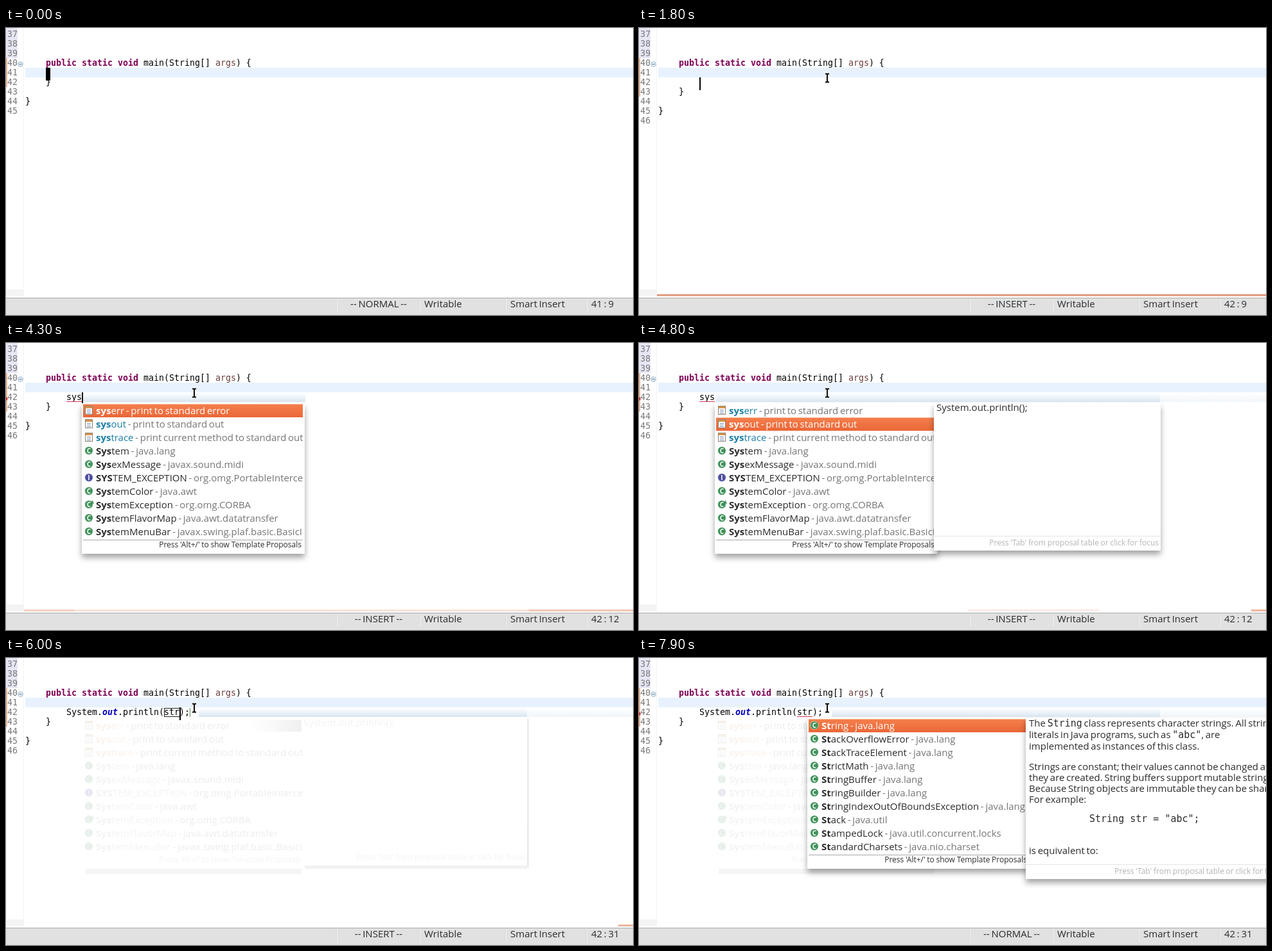
Animation of 976x448 px, one loop 8 s. Source, as an HTML page:

```html
<!DOCTYPE html>
<html lang="en">
<head>
<meta charset="utf-8">
<title>Editor completion</title>
<style>
  html, body { margin: 0; width: 100%; height: 100%; overflow: hidden; background: #fff; }
  svg { display: block; }
  text { white-space: pre; font: 15px "Open Sans", "Noto Sans", sans-serif; word-spacing: -1.2px; fill: #2c2c2c; }
  .code, .mono { font-family: "DejaVu Sans Mono", monospace; word-spacing: 0; }
  .code { font-size: 13.29px; fill: #000; }
  .num { fill: #787878; }
  .kw { font-weight: 700; fill: #7f0055; }
  .arg { fill: #6a3e3e; }
  .field { font-weight: 700; font-style: italic; fill: #0000c0; }
  .small { font-size: 12px; word-spacing: -.4px; }
  .hint { fill: #b4b4b4; }
  .grey { fill: #767676; }
  .tpl { fill: #1b7fa6; }
  .sel, .sel tspan { fill: #fff; }
  .b { font-weight: 700; }
  .icon { font-size: 10px; font-weight: 700; fill: #fff; }
  .shadow { filter: drop-shadow(0 6px 5px rgba(0, 0, 0, .36)); }
  .ghost { opacity: .13; }
  .ghost text { fill: #aaa; }
  .ghost .grey { fill: #777; }
  .ghost .tpl { fill: #e6a070; }
</style>
</head>
<body>
<svg id="stage" width="976" height="448" viewBox="0 0 976 448" xmlns="http://www.w3.org/2000/svg"></svg>
<script>
const LOOP = 8000, TICK = 100, BLINK = 500;
const OPEN = 700, LIST = 3900, DOC = 4400, ACCEPT = 4900, ESC = 6300;

// Tables of [time, value...]
const typed = [[0, ''], [2000, 's'], [2200, 'sy'], [2400, 'sys'], [ACCEPT, ''], [5400, 's'], [5600, 'st'], [5900, 'str']];
const position = [[0, '41 : 9'], [OPEN, '42 : 9'], [2000, '42 : 10'], [2200, '42 : 11'], [2400, '42 : 12'],
  [ACCEPT, '42 : 28'], [5400, '42 : 29'], [5600, '42 : 30'], [5900, '42 : 31']];
const mode = [[0, 'NORMAL'], [OPEN, 'INSERT'], [ESC, 'NORMAL']];
const caretAt = [[0, 62], [OPEN, 94], [2000, 102], [2200, 110], [2400, 118], [LIST, 118],
  [ACCEPT, 246], [5400, 254], [5600, 262], [5900, 270], [ESC, 262]];
const underline = [[0, 0, 0], [3500, 94, 24], [ACCEPT, 94, 168], [5400, 0, 0], [7000, 246, 24]];

// Rows: kind, matched part, rest, detail
const sysRows = [
  't|sys|err|print to standard error', 't|sys|out|print to standard out',
  't|sys|trace|print current method to standard out', 'c|Sys|tem|java.lang',
  'c|Sys|exMessage|javax.sound.midi', 'i|SYS|TEM_EXCEPTION|org.omg.PortableInterceptor',
  'c|Sys|temColor|java.awt', 'a|Sys|temException|org.omg.CORBA',
  'c|Sys|temFlavorMap|java.awt.datatransfer', 'c|Sys|temMenuBar|javax.swing.plaf.basic.BasicInternalFrame'];
const strRows = [
  'c|St|ring|java.lang', 'c|St|ackOverflowError|java.lang', 'c|St|ackTraceElement|java.lang',
  'c|St|rictMath|java.lang', 'c|St|ringBuffer|java.lang', 'c|St|ringBuilder|java.lang',
  'c|St|ringIndexOutOfBoundsException|java.lang', 'c|St|ack|java.util',
  'c|St|ampedLock|java.util.concurrent.locks', 'c|St|andardCharsets|java.nio.charset'];

const span = (cls, s) => `<tspan class="${cls}">${s}</tspan>`;
const text = (x, y, s, cls = '', more = '') => `<text x="${x}" y="${y}" class="${cls}" ${more}>${s}</text>`;
const rect = (x, y, w, h, fill, more = '') => `<rect x="${x}" y="${y}" width="${w}" height="${h}" fill="${fill}" ${more}/>`;
const during = (from, to, s) => `<g data-from="${from}" data-to="${to}">${s}</g>`;
const base = line => 14 + 15 * (line - 37);
const code = (line, x, s) => text(x, base(line), s, 'code');
const number = n => text(2, base(n), n, 'code num');

function icon(kind, x, y) {
  if (kind === 't') {
    return rect(x - 5.5, y - 6.5, 11, 13, '#fff', 'stroke="#8a7f70"') + rect(x - 5, y - 6, 10, 3, '#d8954a') +
      [-1, 1.5, 4].map(d => rect(x - 3, y + d, 6, 1, '#7d93b8')).join('');
  }
  const fill = kind === 'i' ? '#4f4f9f' : '#3f9259';
  return `<circle cx="${x}" cy="${y}" r="6.3" fill="${fill}" stroke="#fff" stroke-opacity=".5"/>` +
    text(x, y + 3.7, kind === 'i' ? 'I' : 'C', 'icon', 'text-anchor="middle"') +
    (kind === 'a' ? text(x + 3, y - 1, 'A', '', 'style="font-size:7px;font-weight:700;fill:#2f7a46"') : '');
}

function listRow(row, i, x, chosen) {
  const [kind, hit, rest, detail] = row.split('|');
  const name = kind === 't' ? 'tpl' : '';
  return icon(kind, x + 11, 105 + 21 * i) +
    text(x + 22, 111 + 21 * i, span('b ' + name, hit) + span(name, rest) + span('grey', ' - ' + detail), chosen ? 'sel' : '');
}

// The inner svg clips long rows and keeps stage coordinates
const rowsAt = (x, rows, sel) =>
  `<svg x="${x + 2}" y="94" width="342" height="234" viewBox="${x + 2} 94 342 234">` +
  rows.map((r, i) => listRow(r, i, x, i === sel)).join('') + '</svg>';
const footer = x => text(x + 342, 319, "Press 'Alt+/' to show Template Proposals", 'small', 'text-anchor="end"');

const list = (x, rows, sel) =>
  rect(x, 94, 347, 235, '#fff', 'class="shadow"') +
  rect(x + 2, 95.5 + 21 * sel, 342, 20.5, 'url(#pick)') +
  rowsAt(x, rows, sel) + rect(x + 2, 307, 342, 1, '#a8a8a8') + footer(x);

const hint = (x, y) => text(x, y, "Press 'Tab' from proposal table or click for focus", 'small hint', 'text-anchor="end"');
const doc = (x, w, bottom, body) =>
  rect(x, 94, w, bottom - 94, '#fff', 'class="shadow"') + rect(x, bottom - 23, w, 1, '#e6e6e6') +
  body + hint(x + w - 3, bottom - 8);

const templateDoc = name => doc(459, 353, 324, text(463, 106, `System.${name}.println();`));
const mono = s => span('mono', s);
const stringDoc = doc(602, 405, 345, [
  [107, `The ${mono('String')} class represents character strings. All string`],
  [125, `literals in Java programs, such as ${mono('"abc"')}, are`],
  [143, 'implemented as instances of this class.'],
  [175, 'Strings are constant; their values cannot be changed after'],
  [192, 'they are created. String buffers support mutable strings.'],
  [209, 'Because String objects are immutable they can be shared.'],
  [226, 'For example:'],
  [306, 'is equivalent to:']
].map(([y, s]) => text(607, y, s)).join('') + text(701, 256, 'String str = "abc";', 'mono'));

const residue = `<g class="ghost">${rowsAt(118, sysRows, -1)}${footer(118)}
  ${text(463, 106, 'System.out.println();')}${hint(809, 315)}
  ${rect(380, 97, 80, 18, 'url(#dim)')}${rect(124, 329, 336, 8, '#bbb')}
  ${rect(465, 324, 346, 5, '#999')}${rect(811, 95, 3, 232, '#777')}</g>`;

const stripe = (x, w, fill, y = 416, h = 3) => rect(x, y, w, h, fill);
const scrollLine =
  during(900, 2500, stripe(28, 948, '#f3cbbb', 415, 4) + stripe(28, 948, '#e0967a', 416, 2)) +
  during(2500, 3200, stripe(28, 948, '#f4cdbc')) +
  during(3200, 4500, stripe(28, 78, '#f6d2c2') + stripe(106, 708, '#fae2d8') + stripe(814, 162, '#f3c5b1')) +
  during(4500, 5200, stripe(512, 204, '#fbe6dd', 416, 2)) +
  during(4500, 7200, stripe(953, 23, '#eeb59c'));

const brace = (line, x) => code(line, x, '}');
const band = (x, end, opacity) => rect(x, 77, end - x, 15, 'url(#band)', `opacity="${opacity}"`);
const beam = (color, width) =>
  `<path d="M-3-6.5h2L0-5.5 1-6.5H3M0-5.5v11M-3 6.5h2L0 5.5 1 6.5H3" stroke="${color}" stroke-width="${width}"/>`;

const stage = document.getElementById('stage');
stage.innerHTML = `
  <defs>
    <linearGradient id="pick" x2="0" y2="1"><stop stop-color="#f57f4c"/><stop offset="1" stop-color="#ea6738"/></linearGradient>
    <linearGradient id="dim"><stop stop-color="#999" stop-opacity="0"/><stop offset="1" stop-color="#888"/></linearGradient>
    <linearGradient id="band" x2="0" y2="1"><stop stop-color="#fff"/><stop offset=".4" stop-color="#eef4fb"/><stop offset="1" stop-color="#cfdeed"/></linearGradient>
    <pattern id="hatch" width="2" height="2" patternUnits="userSpaceOnUse">
      <rect width="2" height="2" fill="#f8e3d6"/><rect width="1" height="1" fill="#d98c5c"/><rect x="1" y="1" width="1" height="1" fill="#d98c5c"/>
    </pattern>
  </defs>
  ${rect(0, 0, 976, 448, '#fff')}
  ${rect(0, 0, 1, 408, '#f1f1f1')}${rect(27, 0, 1, 408, '#f3f3f3')}
  ${rect(0, 0, 18, 47, '#e6e6f5')}
  ${rect(0, 408, 28, 10, '#f4f4f4')}
  ${rect(30, 62, 946, 15, '#e8f2fe')}
  ${during(LIST, ACCEPT, band(120, 466, .8))}
  ${during(DOC, ACCEPT, band(466, 811, .8))}
  ${during(ACCEPT, LOOP, band(300, 811, .8))}
  ${during(DOC, LOOP, band(811, 976, .3))}
  ${during(0, OPEN, rect(0, 47, 2, 45, 'url(#hatch)'))}
  ${during(OPEN, LOOP, rect(0, 47, 2, 60, 'url(#hatch)'))}
  ${[37, 38, 39, 40, 41, 42, 43, 44, 45].map(number).join('')}
  ${during(OPEN, LOOP, number(46))}
  <circle cx="22.5" cy="56.5" r="3.8" fill="#e3edf6" stroke="#9db7cd"/>${rect(20.5, 56, 4, 1, '#55799a')}
  ${code(40, 62, span('kw', 'public static void') + ' main(String[] ' + span('arg', 'args') + ') {')}
  ${during(0, OPEN, brace(42, 62) + brace(44, 30))}
  ${during(OPEN, LOOP, brace(43, 62) + brace(45, 30))}
  ${during(ACCEPT, LOOP, residue)}
  <text class="code" x="94" y="${base(42)}"><tspan id="head"></tspan><tspan id="mid"></tspan><tspan id="tail"></tspan></text>
  <rect id="wave" y="91" height="1" fill="#d4365c"/>
  <circle id="error" cx="0" cy="87" r="2.6" fill="#cf3a3a"/>
  <g id="link"><rect id="slot" x="246.5" y="78.5" height="13" fill="none" stroke="#222"/><rect id="exit" y="78" width="1" height="14" fill="#5d8a5d"/></g>
  <rect id="caret" height="20" fill="#000"/>
  ${text(262, base(42), 'r', 'code sel', 'id="under"')}
  ${scrollLine}
  ${during(LIST, 4600, list(118, sysRows, 0))}
  ${during(4600, ACCEPT, list(118, sysRows, 1))}
  ${during(DOC, 4600, templateDoc('err'))}
  ${during(4600, ACCEPT, templateDoc('out'))}
  ${during(6500, LOOP, list(262, strRows, 0))}
  ${during(7200, LOOP, stringDoc)}
  <g id="mouse" fill="none">${beam('#fff', 4)}${beam('#000', 1.9)}</g>
  ${rect(0, 421, 976, 27, '#e1e1e1')}${rect(0, 421, 976, 1, '#a9a9a9')}
  ${[515, 644, 778, 904].map(x => rect(x, 423, 1, 21, '#f4f4f4') + rect(x - 1, 423, 1, 21, '#d6d6d6')).join('')}
  ${text(580, 436, '', '', 'id="mode" text-anchor="middle"')}
  ${text(651, 436, 'Writable')}${text(785, 436, 'Smart Insert')}
  ${text(911, 436, '', '', 'id="pos"')}`;

const $ = id => document.getElementById(id);
const timed = [...stage.querySelectorAll('[data-from]')];
const show = (el, on) => { el.style.display = on ? '' : 'none'; };
const set = (el, attrs) => { for (const k in attrs) el.setAttribute(k, attrs[k]); };
const last = (table, t) => table.filter(row => row[0] <= t).pop();

function drawLine(t) {
  const word = last(typed, t)[1], full = t >= ACCEPT;
  $('head').textContent = full ? 'System.' : word;
  $('mid').textContent = full ? 'out' : '';
  $('mid').setAttribute('class', t >= 6000 ? 'field' : '');
  $('tail').textContent = full ? `.println(${word});` : '';
  const [, x, width] = last(underline, t);
  set($('wave'), { x, width });
  show($('error'), width > 0);
  show($('link'), full && t < ESC);
  set($('slot'), { width: 8 * word.length || 7 });
  set($('exit'), { x: 262 + 8 * word.length });
}

function drawCaret(t) {
  const [since, x] = last(caretAt, t);
  const lit = Math.floor((t - since) / BLINK) % 2 === 0;
  const block = t < OPEN || t >= ESC;
  show($('caret'), lit);
  set($('caret'), { x, y: t < OPEN ? 62 : 77, width: block ? (t < OPEN ? 7 : 8) : 2 });
  show($('under'), lit && t >= ESC);
}

function drawMouse(t) {
  const k = Math.min(1, Math.max(0, (t - 300) / 600)), e = k * (2 - k);
  show($('mouse'), t >= 300);
  set($('mouse'), { transform: `translate(${Math.round(457 - 164 * e)} ${Math.round(78 * e)})` });
}

function draw(now) {
  const t = Math.floor(now % LOOP / TICK) * TICK;
  for (const g of timed) show(g, t >= +g.dataset.from && t < +g.dataset.to);
  drawLine(t);
  drawCaret(t);
  drawMouse(t);
  $('mode').textContent = `-- ${last(mode, t)[1]} --`;
  $('pos').textContent = last(position, t)[1];
}

const start = performance.now();
function frame() {
  draw(performance.now() - start);
  requestAnimationFrame(frame);
}
frame();
</script>
</body>
</html>
```
